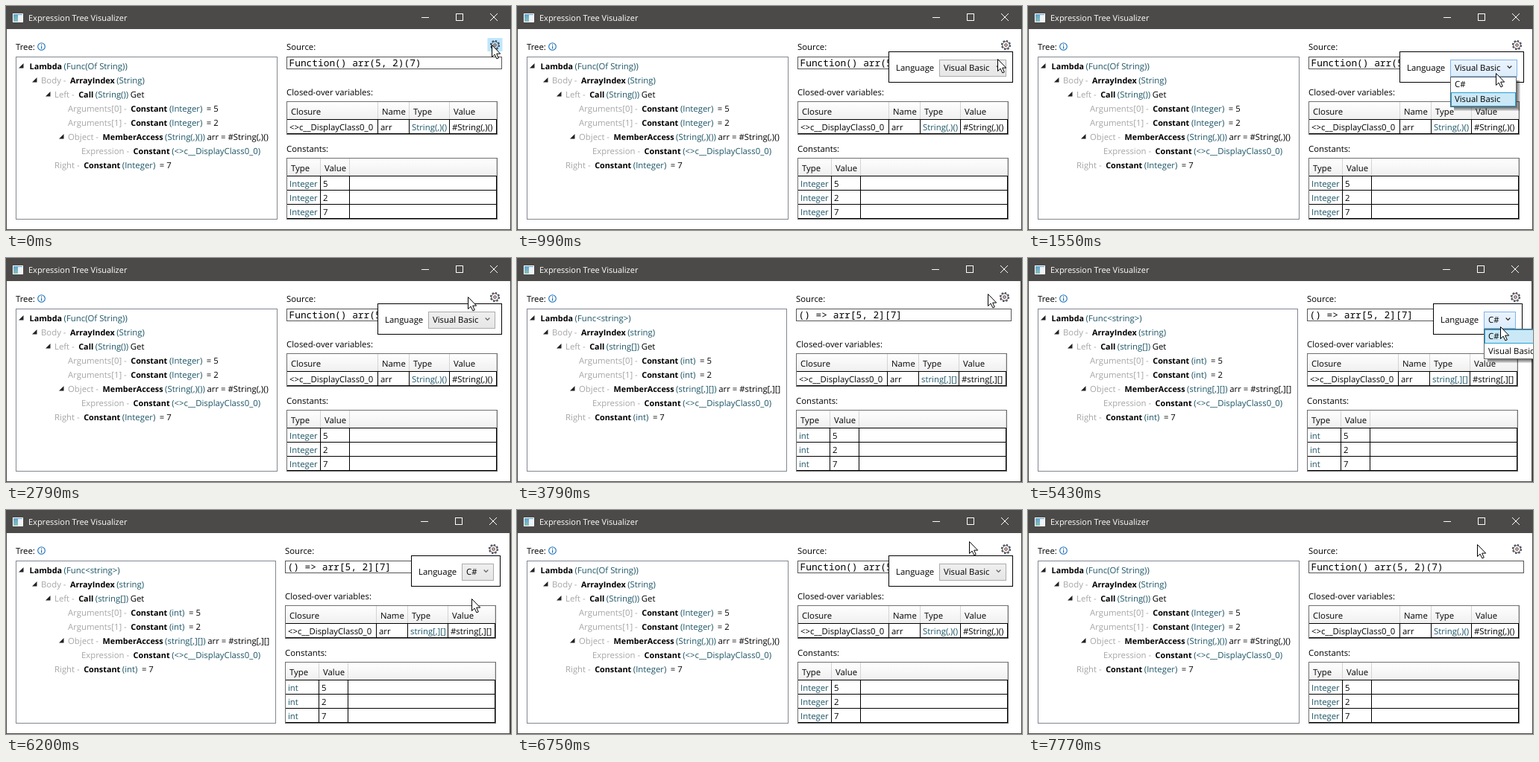
These frames come from a looping animation (677x301 px, 8150 ms). An HTML page with a canvas:

```html
<!DOCTYPE html>
<html lang="en">
<head>
<meta charset="utf-8">
<title>Expression Tree Visualizer</title>
<style>
  html, body { margin: 0; width: 100%; height: 100%; overflow: hidden; background: #4c4a48; }
  canvas { display: block; }
</style>
</head>
<body>
<canvas id="stage" width="677" height="301"></canvas>
<script>
const ctx = document.getElementById('stage').getContext('2d');
const LOOP = 8150, STEP = 77, CLICK_MS = 170;
const UI = '11.35px "Open Sans", sans-serif';
const TITLE = '11px "Open Sans", sans-serif';
const BOLD = 'bold 10.8px "Open Sans", sans-serif';
const CODE = '12.83px "Noto Sans Mono", monospace';
const CHROME = '#4c4a48', TYPE = '#1d5566', MUTED = '#a6a6a6';
const CLOSURE = '<>c__DisplayClass0_0';

// Pointer moves; the pointer rests between them
const HOME = { x: 651, y: 52 };
const MOVES = [
  { from: 840, to: 1160, x: 640, y: 83 },
  { from: 1480, to: 1550, x: 627, y: 90 },
  { from: 1640, to: 1720, x: 614, y: 107 },
  { from: 2490, to: 2790, x: 619, y: 52 },
  { from: 2870, to: 3100, x: 617, y: 47 },
  { from: 3650, to: 3790, x: 638, y: 49 },
  { from: 3870, to: 4100, x: 651, y: 50 },
  { from: 4650, to: 4650, x: 651, y: 61 },
  { from: 4730, to: 4880, x: 637, y: 79 },
  { from: 5350, to: 5750, x: 624, y: 119 },
  { from: 6290, to: 6670, x: 606, y: 42 },
  { from: 7610, to: 7770, x: 602, y: 46 }
];

// Press and effect times; each round opens the popup, opens the list, picks, closes
const CLICKS = [[440, 610], [1240, 1320], [2020, 2260], [3260, 3340],
  [4250, 4420], [5030, 5120], [5970, 6120], [6980, 7050]];
const CSHARP = [2870, 6670];

const inside = (p, x, y, w, h) => p.x >= x && p.x < x + w && p.y >= y && p.y < y + h;

function pointerAt(t) {
  let { x, y } = HOME;
  for (const m of MOVES) {
    if (t < m.from) break;
    const steps = Math.round((m.to - m.from) / STEP) + 1;
    const u = Math.min(1, (Math.floor((t - m.from + 8) / STEP) + 1) / steps);
    x += (m.x - x) * u;
    y += (m.y - y) * u;
  }
  return { x: Math.round(x), y: Math.round(y) };
}

function stateAt(t) {
  const phase = CLICKS.filter(([, effect]) => t >= effect).length % 4;
  return {
    cs: t >= CSHARP[0] && t < CSHARP[1],
    popup: phase > 0,
    list: phase === 2,
    pressed: CLICKS.some(([press]) => t >= press && t < press + CLICK_MS)
  };
}

function text(str, x, y, color = '#000', font = UI) {
  ctx.font = font;
  ctx.fillStyle = color;
  ctx.fillText(str, x, y);
  return ctx.measureText(str).width;
}

function rect(x, y, w, h, color) {
  ctx.fillStyle = color;
  ctx.fillRect(x, y, w, h);
}

function frame(x, y, w, h, fill, stroke) {
  rect(x, y, w, h, fill);
  ctx.strokeStyle = stroke;
  ctx.lineWidth = 1;
  ctx.strokeRect(x + .5, y + .5, w - 1, h - 1);
}

function line(points, close) {
  ctx.beginPath();
  points.forEach(([x, y]) => ctx.lineTo(x, y));
  if (close) ctx.closePath();
}

function ring(x, y, r, color, width) {
  ctx.beginPath();
  ctx.arc(x, y, r, 0, Math.PI * 2);
  ctx.strokeStyle = color;
  ctx.lineWidth = width;
  ctx.stroke();
}

function vertical(y, h, top, bottom) {
  const g = ctx.createLinearGradient(0, y, 0, y + h);
  g.addColorStop(0, top);
  g.addColorStop(1, bottom);
  return g;
}

function drawWindow(cs) {
  const right = cs ? 675 : 676;
  rect(0, 0, 677, 301, CHROME);
  rect(1, 31, right - 1, 269, '#fff');
  frame(9, 10, 14, 12, vertical(10, 12, '#5f9fd0', '#8cc3b4'), '#fff');
  rect(16, 12, 6, 9, '#eef3f6');
  text('Expression Tree Visualizer', 30, 20, '#fff', TITLE);

  const y = 10;
  rect(right - 119, 15, 10, 1, '#fff');
  ctx.strokeStyle = '#fff';
  ctx.lineWidth = 1;
  ctx.strokeRect(right - 72.5, y + .5, 9, 9);
  for (const [a, b] of [[0, 10], [10, 0]]) {
    line([[right - 27, y + a], [right - 17, y + b]]);
    ctx.stroke();
  }
}

function drawTree(cs) {
  const pick = (vb, c) => cs ? c : vb;
  text('Tree:', 13, 59);
  ring(47.5, 54.5, 4.8, '#1b6fb8', 1.1);
  rect(47, 51.5, 1.2, 1.3, '#1b6fb8');
  rect(47, 53.7, 1.2, 3.8, '#1b6fb8');
  frame(13, 68, cs ? 349 : 351, 219, '#fff', '#828790');

  // depth, label, node, type, value, has children
  const int = pick('(Integer)', '(int)');
  const rows = [
    [0, '', 'Lambda', pick('(Func(Of String))', '(Func<string>)'), '', true],
    [1, 'Body - ', 'ArrayIndex', pick('(String)', '(string)'), '', true],
    [2, 'Left - ', 'Call', pick('(String())', '(string[])'), 'Get', true],
    [3, 'Arguments[0] - ', 'Constant', int, ' = 5'],
    [3, 'Arguments[1] - ', 'Constant', int, ' = 2'],
    [3, 'Object - ', 'MemberAccess', pick('(String(,)())', '(string[,][])'),
      pick('arr = #String(,)()', 'arr = #string[,][]'), true],
    [4, 'Expression - ', 'Constant', `(${CLOSURE})`, ''],
    [2, 'Right - ', 'Constant', int, ' = 7']
  ];
  rows.forEach(([depth, label, node, type, value, parent], i) => {
    const y = 85 + 19 * i, gap = 2.6;
    let x = 29 + 18 * depth;
    if (parent) drawArrow(x - 12, y - 8);
    x += text(label, x, y, MUTED) + gap;
    x += text(node, x, y, '#000', BOLD) + gap;
    x += text(type, x, y, TYPE) + gap;
    text(value, x, y);
  });
}

function drawArrow(x, y) {
  line([[x + 6.5, y], [x + 6.5, y + 6.5], [x, y + 6.5]], true);
  ctx.fillStyle = '#222';
  ctx.fill();
}

// Columns: width, title, cells, cell colour
function drawGrid(x, y, columns) {
  const w = 283, head = 24, h = 19;
  const rows = columns[0][2].length, body = y + head;
  frame(x, y, w, head + rows * h + 2, '#fff', '#6f6f6f');
  rect(x + 1, y + 1, w - 2, head - 1, vertical(y, head, '#fff', '#f0f0f0'));
  for (let i = 0; i <= rows; i++) rect(x + 1, body + i * h, w - 2, 1, '#000');

  let left = x;
  for (const [width, title, cells, color] of columns) {
    text(title, left + 6, y + 18);
    cells.forEach((cell, i) => text(cell, left + 4, body + 15 + h * i, color));
    left += width;
    rect(left, y + 1, 1, head - 1, '#d3d3d3');
    rect(left, body, 1, rows * h, '#000');
  }
}

function drawGear(x, y, hot) {
  if (hot) rect(x - 10, y - 9.5, 20, 18, '#bee6fd');
  ctx.setLineDash([2.4, 2.1]);
  ring(x, y, 5.8, '#3a3f4c', 1.6);
  ctx.setLineDash([]);
  ring(x, y, 4.7, '#3a3f4c', 1);
  ring(x, y, 1.7, '#70483f', 1.2);
}

function drawDetails(cs, hotGear) {
  const x = cs ? 374 : 376;
  text('Source:', x, 59);
  frame(x, 68, 289, 17, '#fff', '#565656');
  text(cs ? '() => arr[5, 2][7]' : 'Function() arr(5, 2)(7)', x + 3.5, 81, '#000', CODE);
  drawGear(x + 279.5, 52.5, hotGear);

  text('Closed-over variables:', x, 120);
  drawGrid(x, 128, [
    [122, 'Closure', [CLOSURE]],
    [42, 'Name', ['arr']],
    [54, 'Type', [cs ? 'string[,][]' : 'String(,)()'], TYPE],
    [63, 'Value', [cs ? '#string[,][]' : '#String(,)()']]
  ]);

  text('Constants:', x, 196);
  drawGrid(x, 204, [
    [45, 'Type', Array(3).fill(cs ? 'int' : 'Integer'), TYPE],
    [39, 'Value', ['5', '2', '7']],
    [197, '', []]
  ]);
}

function drawPopup(cs, open, p) {
  const x = cs ? 543 : 498, right = cs ? 663 : 665;
  const cx = x + 68, y = 72, w = right - 9 - cx, h = 23;
  const hot = inside(p, cx, y, w, h);
  frame(x, 61, right - x, 42, '#fff', '#000');
  text('Language', x + 10, 87);
  frame(cx, y, w, h, hot ? vertical(y, h, '#ecf4fc', '#dcecfc') : vertical(y, h, '#f0f0f0', '#e5e5e5'),
    hot ? '#7eb4ea' : '#acacac');
  text(cs ? 'C#' : 'Visual Basic', cx + 6, 87);
  const ax = right - 19.5;
  line([[ax - 2.8, 80.5], [ax, 83.3], [ax + 2.8, 80.5]]);
  ctx.strokeStyle = hot ? '#222' : '#606060';
  ctx.lineWidth = 1.2;
  ctx.stroke();
  if (open) drawList(cx, y + h, cs, p);
}

function drawList(x, y, cs, p) {
  const w = 89, h = 41, row = 20;
  for (let i = 5; i > 0; i--) rect(x + 5, y + 5, w - 5 + i, h - 5 + i, 'rgba(0,0,0,.13)');
  frame(x, y, w, h, '#fff', '#646464');
  const hovered = Math.floor((p.y - y) / row);
  const active = hovered < 0 ? (cs ? 0 : 1) : hovered;
  frame(x + 1, y + 1 + row * active, w - 2, row - 1, '#cbe8f6', '#26a0da');
  ['C#', 'Visual Basic'].forEach((name, i) => text(name, x + 6, y + 14 + row * i));
}

function drawPointer({ x, y }, pressed) {
  if (pressed) {
    ctx.beginPath();
    ctx.arc(x, y, 12, 0, Math.PI * 2);
    ctx.fillStyle = 'rgba(255,255,0,.47)';
    ctx.fill();
  }
  const shape = [[0, 0], [0, 16], [3.6, 12.6], [6.4, 18.4], [8.8, 17.4], [6.2, 11.6], [11.2, 11.6]];
  line(shape.map(([a, b]) => [x + a + .5, y + b + .5]), true);
  ctx.fillStyle = '#fff';
  ctx.fill();
  ctx.strokeStyle = '#000';
  ctx.lineWidth = 1;
  ctx.stroke();
}

function draw(t) {
  const p = pointerAt(t), { cs, popup, list, pressed } = stateAt(t);
  ctx.textRendering = 'geometricPrecision';
  drawWindow(cs);
  drawTree(cs);
  drawDetails(cs, !popup && inside(p, cs ? 644 : 646, 43, 20, 18));
  if (popup) drawPopup(cs, list, p);
  drawPointer(p, pressed);
}

const start = performance.now();
function tick() {
  draw((performance.now() - start) % LOOP);
  requestAnimationFrame(tick);
}
tick();
</script>
</body>
</html>
```
